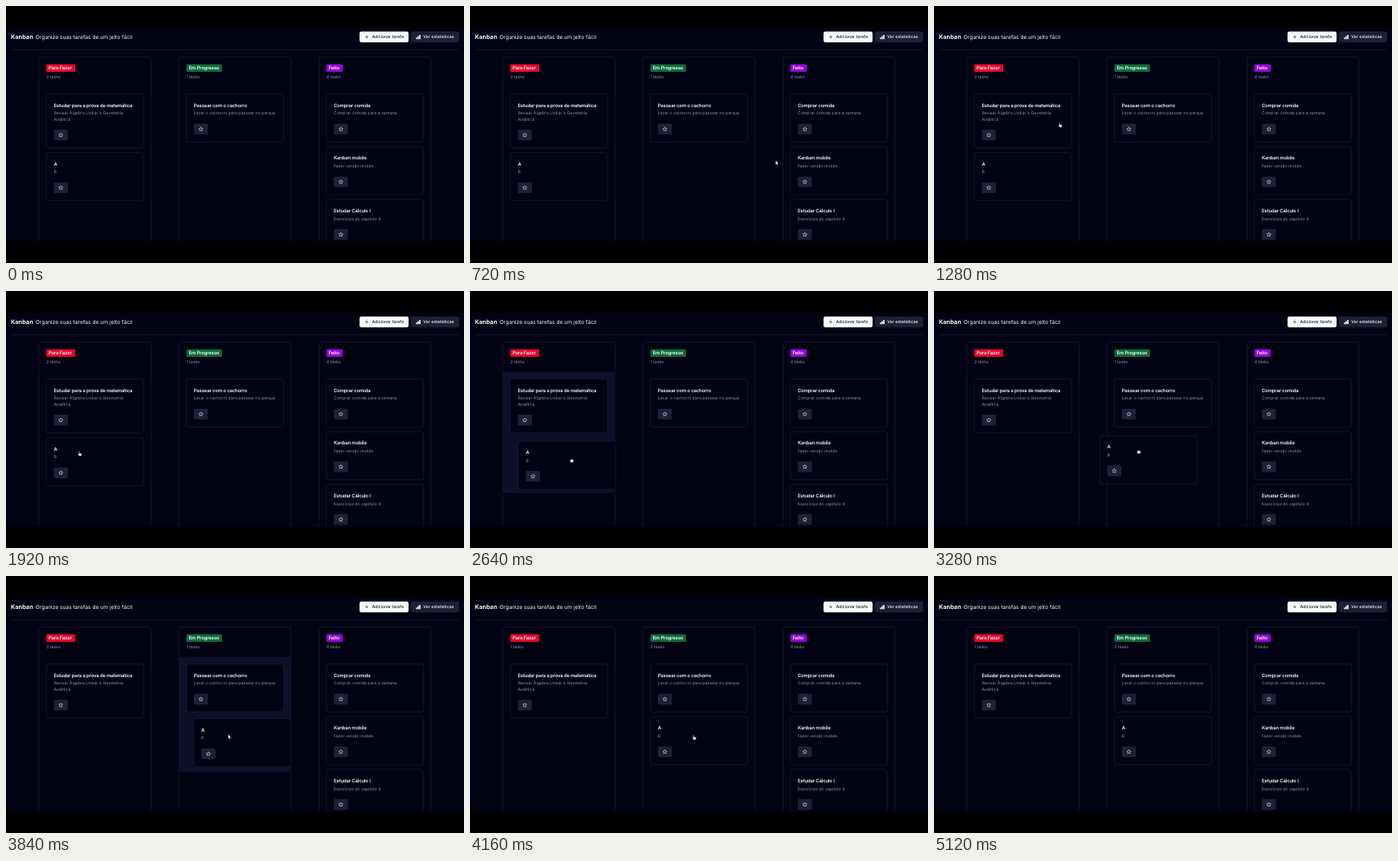
An HTML page for the animation above (6.32 s loop, 570 by 320 pixels).

```html
<!DOCTYPE html>
<html lang="pt-BR">
<head>
<meta charset="utf-8">
<title>Kanban</title>
<style>
  html, body { margin: 0; width: 100%; height: 100%; overflow: hidden; background: #000; }
  svg { display: block; width: 570px; height: 320px; }
  text {
    font-family: Inter, sans-serif; font-optical-sizing: none;
    text-rendering: geometricPrecision; white-space: pre; fill: #f8fafc;
  }
  .brand { font-size: 7.42px; font-weight: 700; }
  .slogan { font-size: 6.68px; }
  .button { font-size: 5.2px; font-weight: 500; }
  .title { font-size: 5.94px; font-weight: 600; letter-spacing: -.025em; }
  .muted { font-size: 5.2px; fill: #8b93a7; }
  .border { fill: none; stroke: #20263b; stroke-width: .5; }
  .card { fill: #010313; }
  .chip { fill: #1c2136; }
  .star { fill: none; stroke: #f8fafc; stroke-width: .55; stroke-linejoin: round; }
  .cursor { fill: #f4f4f6; stroke: #08080c; stroke-width: .45; stroke-linejoin: round; }
</style>
</head>
<body>
<svg viewBox="0 0 570 320">
  <clipPath id="screen"><rect y="26.4" width="570" height="267.2"/></clipPath>
  <g id="page" clip-path="url(#screen)"></g>
</svg>
<script>
const LOOP = 6320, STEP = 80;
const CARD_W = 121, CARD_H = 59.7, LINE = 7.42, GAP = 5.9, LIST_TOP = 100.5;
const page = document.getElementById('page');

function add(parent, tag, attrs = {}, content) {
  const node = document.createElementNS('http://www.w3.org/2000/svg', tag);
  for (const key in attrs) node.setAttribute(key, attrs[key]);
  if (content) node.textContent = content;
  return parent.appendChild(node);
}
const label = (parent, x, y, type, content) => add(parent, 'text', { x, y, class: type }, content);
const box = (parent, x, y, width, height, rx, attrs) =>
  add(parent, 'rect', { x, y, width, height, rx, ...attrs });
const place = (node, x, y) => node.setAttribute('transform', `translate(${x} ${y})`);
const show = (node, on) => node.setAttribute('visibility', on ? 'visible' : 'hidden');

function star(parent, cx, cy) {
  const points = Array.from({ length: 10 }, (_, i) => {
    const r = i % 2 ? 1.3 : 2.65, a = Math.PI * (i / 5 - .5);
    return [cx + r * Math.cos(a), cy + r * Math.sin(a)].map(v => v.toFixed(2)).join();
  });
  add(parent, 'polygon', { points: points.join(' '), class: 'star' });
}

function card(x, y, title, lines) {
  const g = add(page, 'g'), extra = (lines.length - 1) * LINE;
  box(g, 0, 0, CARD_W, CARD_H + extra, 2.8, { class: 'border card', style: 'fill:#010313' });
  label(g, 9.2, 16.1, 'title', title);
  lines.forEach((line, i) => label(g, 9.2, 25.8 + i * LINE, 'muted', line));
  box(g, 9.2, 37 + extra, 17.7, 13.4, 2.2, { class: 'chip' });
  star(g, 18.05, 43.8 + extra);
  place(g, x, y);
  return g;
}

// Header
box(page, 0, 26.4, 570, 267.2, 0, { class: 'card' });
label(page, 5.9, 41.1, 'brand', 'Kanban');
label(page, 36.8, 40.9, 'slogan', 'Organize suas tarefas de um jeito fácil');
box(page, 440, 31.8, 61, 13.5, 2.2, { fill: '#f8fafc' });
add(page, 'path', { d: 'M447 38.5h4M449 36.5v4', stroke: '#15192b', 'stroke-width': .55 });
label(page, 455.4, 40.4, 'button', 'Adicionar tarefa').style.fill = '#15192b';
box(page, 504, 31.8, 59.8, 13.5, 2.2, { class: 'chip' });
add(page, 'path', { d: 'M510.3 39.3h1.6v2h-1.6zM512.3 37.6h1.6v3.7h-1.6zM514.3 35.9h1.6v5.4h-1.6z', fill: '#f8fafc' });
label(page, 519.3, 40.4, 'button', 'Ver estatísticas');
add(page, 'path', { d: 'M6 54.4H564', class: 'border' });

// Columns and cards
const columns = [
  { x: 41, name: 'Para Fazer', color: '#e9042b', badge: 36, count: 2, glow: 151,
    cards: [['Estudar para a prova de matemática', 'Revisar Álgebra Linear e Geometria', 'Analítica']] },
  { x: 215.3, name: 'Em Progresso', color: '#0f6b38', badge: 44.3, count: 1, glow: 143.6,
    cards: [['Passear com o cachorro', 'Levar o cachorro para passear no parque']] },
  { x: 389.5, name: 'Feito', color: '#9305d8', badge: 20.4, count: 4, glow: 0,
    cards: [['Comprar comida', 'Comprar comida para a semana'],
            ['Kanban mobile', 'Fazer versão mobile'],
            ['Estudar Cálculo I', 'Exercícios do capítulo 4']] }
];
for (const col of columns) {
  const { x } = col;
  col.highlight = box(page, x, LIST_TOP, 139.4, col.glow, 0, { fill: '#100f28' });
  box(page, x, 63.7, 139.4, 260, 2.8, { class: 'border' });
  box(page, x + 9.1, 72.4, col.badge, 9.7, 1.5, { fill: col.color });
  label(page, x + 12.1, 79.4, 'title', col.name);
  col.counter = label(page, x + 9.2, 89.6, 'muted', `${col.count} tasks`);
  let y = 109.6;
  for (const [title, ...lines] of col.cards) {
    card(x + 9.2, y, title, lines);
    y += CARD_H + GAP + (lines.length - 1) * LINE;
  }
}
const moving = card(50.2, 182.6, 'A', ['B']);

const cursors = {
  arrow: ['M.3.1V5.9L1.7 4.7L2.6 6.7L3.5 6.3L2.6 4.3H4.5Z'],
  hand: ['M1.6.8Q2.1.1 2.6.8V2.6L4.9 3.1Q5.5 3.3 5.4 4L4.9 6.5H2.3L.3 4.1Q.5 3.4 1.6 4.1Z',
         'M3.4 2.9V4M4.2 3.1V4.1'],
  grab: ['M.8 1.5Q1.3.6 2 1.1Q2.6.5 3.2 1.1Q3.9.7 4.3 1.4Q5.2 1.2 5.2 2.2L4.7 5H1.5L.3 3.2Q.2 2.5 1 2.6Z',
         'M2 1.3V2.4M3.2 1.3V2.4M4.2 1.6V2.5']
};
for (const kind in cursors) {
  const g = add(page, 'g', { class: 'cursor' });
  cursors[kind].forEach(d => add(g, 'path', { d }));
  cursors[kind] = g;
}

// Keys: time, x, y and, for the pointer, its shape
const dragPath = [
  [2560, 50.2, 182.6], [2640, 60.3, 187.1], [2720, 85.2, 192], [2800, 150, 150],
  [2880, 240, 82], [2960, 298, 74], [3040, 270, 120], [3120, 222, 170],
  [3200, 198.5, 180], [3280, 206.3, 180.3], [3360, 213.4, 181.1],
  [3600, 237, 180.6], [3760, 237, 180.6], [3840, 233.9, 177.7],
  [3920, 228, 176.2], [4080, 224.5, 175.2]
];
const pointerPath = [
  [480, 521, 218, 'arrow'], [560, 480, 208, 'hand'], [720, 380, 192, 'arrow'],
  [880, 270, 180, 'arrow'], [1040, 205, 176, 'arrow'], [1200, 176, 156, 'arrow'],
  [1280, 154.2, 144.6, 'hand'], [1440, 122, 124.5, 'hand'], [1600, 93, 178, 'hand'],
  [1680, 88.3, 195.4, 'hand'], [1920, 88.8, 199, 'hand'], [3600, 275.9, 197, 'grab'],
  [3840, 276.1, 197, 'arrow'], [4080, 276.1, 197.4, 'hand'], [4160, 276.1, 197.4, 'hand'],
  [4320, 273.5, 202.3, 'hand'], [4480, 273.5, 202.3, 'hand'], [4720, 330, 207, 'arrow'],
  [4880, 400, 215, 'hand'], [5040, 455.5, 220, 'hand']
];

function sample(path, t) {
  const next = path.findIndex(key => key[0] > t);
  if (next < 0) return path[path.length - 1].slice(1);
  if (next === 0) return path[0].slice(1);
  const a = path[next - 1], b = path[next], k = (t - a[0]) / (b[0] - a[0]);
  return [a[1] + (b[1] - a[1]) * k, a[2] + (b[2] - a[2]) * k, a[3]];
}

function pointer(t) {
  if (t >= 1920 && t < 2640) return sample(pointerPath, 1920);
  if (t >= 2640 && t < 3600) {
    const [x, y] = sample(dragPath, t + STEP);
    return [x + 38.7, y + 16.4, 'grab'];
  }
  return sample(pointerPath, t);
}

function draw(now) {
  const t = Math.floor(now % LOOP / STEP) * STEP;
  const [todo, doing, done] = columns;
  const dropped = t >= 4080;

  place(moving, ...sample(dragPath, t));
  show(todo.highlight, t >= 2640 && t < 2800);
  show(doing.highlight, t >= 3440 && !dropped);
  show(done.highlight, false);
  todo.counter.textContent = `${dropped ? 1 : 2} tasks`;
  doing.counter.textContent = `${dropped ? 2 : 1} tasks`;

  const [x, y, shape] = pointer(t);
  for (const kind in cursors) {
    show(cursors[kind], kind === shape && t >= 480 && t < 5120);
    place(cursors[kind], x, y);
  }
}

const start = performance.now();
function tick() {
  draw(performance.now() - start);
  requestAnimationFrame(tick);
}
tick();
</script>
</body>
</html>
```
